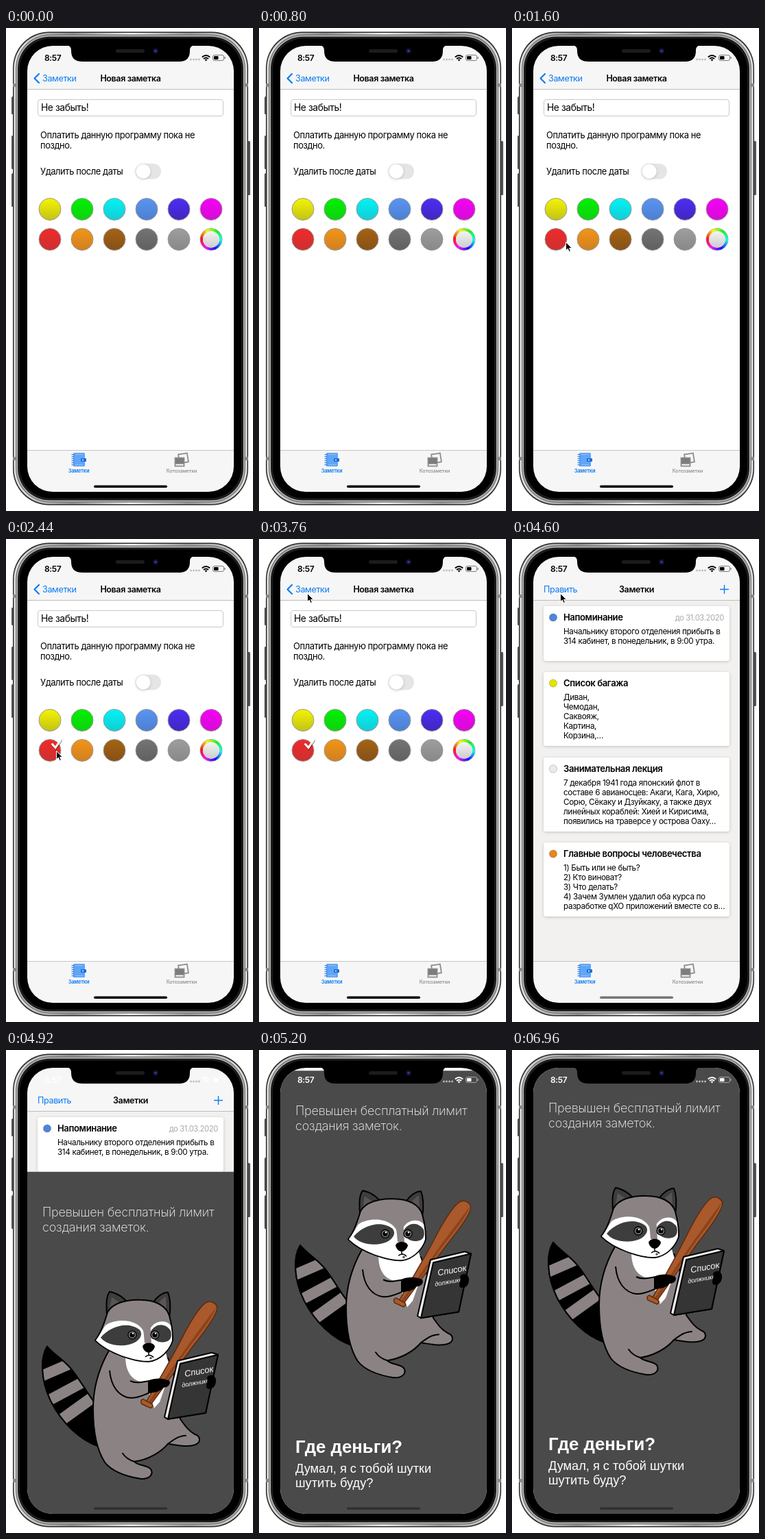
Animation of 360x705 px, one loop 8.6 s. Source, as an HTML page:

```html
<!DOCTYPE html>
<html lang="ru">
<head>
<meta charset="utf-8">
<title>Заметки</title>
<style>
  html, body { margin: 0; width: 100%; height: 100%; overflow: hidden; background: #fff; }
  svg { display: block; width: 360px; height: 705px; }
  text { font-family: Inter, Roboto, sans-serif; letter-spacing: -.03em; white-space: pre; }
  .bold { font-weight: 600; }
  .blue { fill: #0a7bf5; }
  .mid { text-anchor: middle; }
  .end { text-anchor: end; }
  .dark text { fill: #fff; font-family: "Liberation Sans", Arial, sans-serif; letter-spacing: 0; }
  .dark .thin { font-family: Inter, sans-serif; font-weight: 200; letter-spacing: -.01em; }
  .ink { stroke: #000; stroke-width: 2; stroke-linejoin: round; stroke-linecap: round; }
</style>
</head>
<body>
<svg id="stage" viewBox="0 0 360 705"></svg>
<script>
const LOOP = 8600, STEP = 40;
const FUR = '#8b8383', MASK = '#3d3d3d';

// ---- markup helpers ----
const rect = (x, y, w, h, r, fill, more = '') =>
  `<rect x="${x}" y="${y}" width="${w}" height="${h}" rx="${r}" fill="${fill}" ${more}/>`;
const circle = (x, y, r, fill, more = '') => `<circle cx="${x}" cy="${y}" r="${r}" fill="${fill}" ${more}/>`;
const path = (d, fill, more = '') => `<path d="${d}" fill="${fill}" ${more}/>`;
const line = (d, color, width, more = '') => path(d, 'none', `stroke="${color}" stroke-width="${width}" ${more}`);
const ink = (d, fill) => path(d, fill, 'class="ink"');
const text = (x, y, size, str, cls = '', more = '') =>
  `<text x="${x}" y="${y}" font-size="${size}" class="${cls}" ${more}>${str}</text>`;
const group = (id, body, more = '') => `<g id="${id}" ${more}>${body}</g>`;

let defs = '';
function gradient(id, colors, horizontal = false) {
  const stops = colors.map((c, i) => `<stop offset="${i / (colors.length - 1)}" stop-color="${c}"/>`).join('');
  defs += `<linearGradient id="${id}" x2="${horizontal ? 1 : 0}" y2="${horizontal ? 0 : 1}">${stops}</linearGradient>`;
  return `url(#${id})`;
}

// ---- device ----
function phoneBody() {
  const buttons = [[8, 100, 26], [8, 157, 49], [8, 212, 49], [351, 165, 79]]
    .map(([x, y, h]) => rect(x, y, 5, h, 1.5, '#555')).join('');
  const steel = gradient('steel', ['#e4e4e4', '#8e8e8e', '#f2f2f2', '#9a9a9a', '#e4e4e4'], true);
  return buttons +
    rect(10, 5.5, 343, 691, 53, '#2b2b2b') +
    rect(11.5, 7, 340, 688, 52, steel) +
    rect(14, 9.5, 335, 683, 50, '#777') +
    rect(15.5, 11, 332, 680, 49, '#c4c4c4') +
    rect(17, 12.5, 329, 677, 47, '#1d1d1d') +
    rect(20, 15.5, 323, 671, 45, '#000') +
    [10, 347].map(x => rect(x, 81, 6, 5, 0, '#888') + rect(x, 626, 6, 5, 0, '#888')).join('');
}

const notch = () =>
  path('M88 25C94 26 95 29 95 33C95 45 101 49 112 49H251C262 49 268 45 268 33C268 29 269 26 275 25Z', '#000') +
  rect(160, 31, 42, 5, 2.5, '#1c1c1c') + circle(218, 33.5, 4, '#10102c') + circle(218, 33.5, 1.8, '#2b3b9a');

function statusBar() {
  const dots = [270, 274, 278, 282].map(x => circle(x - .5, 46, 1.4, '#bbb')).join('');
  return text(56, 48, 12, '8:57', 'bold', 'fill="currentColor"') + dots +
    line('M285.8 42.5Q291.5 37.4 297.2 42.5M288 45Q291.5 42 295 45', 'currentColor', 1.9) +
    path('M289.6 46.2Q291.5 44.8 293.4 46.2L291.5 48.4Z', 'currentColor') +
    rect(301.5, 39.5, 16, 8, 2.4, 'none', 'stroke="currentColor" stroke-opacity=".5"') +
    rect(303, 41, 6.5, 5, 1, 'currentColor') + rect(318.5, 42, 1.3, 3, .6, 'currentColor', 'opacity=".5"');
}

// ---- note editor ----
function swatches() {
  const pairs = [
    ['#f4f400', '#c2c218'], ['#00f200', '#10d010'], ['#00f4f4', '#14ccd4'],
    ['#5a94f2', '#4c7fd0'], ['#4d2cf6', '#4227bd'], ['#f600f6', '#d40cd4'],
    ['#f02a2a', '#cc3030'], ['#f29418', '#d08020'], ['#a56312', '#865018'],
    ['#747474', '#606060'], ['#9e9e9e', '#888888'], ['#f4f4f4', '#cdcdcd']];
  return pairs.map((pair, i) => {
    const x = 64 + i % 6 * 47, y = i < 6 ? 264.5 : 308.5, last = i === 11;
    const fill = gradient('swatch' + i, pair);
    let out = circle(x, y, 16, last ? '#ddd' : fill, 'stroke="#999"');
    if (last) {
      for (let k = 0; k < 36; k++) {
        const at = a => `${x + 14 * Math.cos(a)} ${y + 14 * Math.sin(a)}`;
        const a = Math.PI + k * Math.PI / 18;
        out += line(`M${at(a)}L${at(a + .2)}`, `hsl(${k * 10},95%,52%)`, 3.6);
      }
      out += circle(x, y, 12, fill);
    }
    return out;
  }).join('');
}

const check = () => group('check',
  line('M67.5 299.5L72 304.5L79.5 293.5', '#0005', 4, 'transform="translate(.5 1)" stroke-linecap="round"') +
  line('M67.5 299.5L72 304.5L79.5 293.5', '#fff', 3, 'stroke-linecap="round"'));

const editor = () => group('editor',
  rect(31, 89, 301, 528, 0, '#fff', 'filter="url(#shade)"') +
  rect(46.5, 104.5, 270, 24, 3.5, '#fff', 'stroke="#c9c9c9"') +
  text(51, 121, 13.8, 'Не забыть!') +
  text(50, 160.5, 12.9, 'Оплатить данную программу пока не') +
  text(50, 176, 12.9, 'поздно.') +
  text(50, 214, 12.9, 'Удалить после даты') +
  rect(188.5, 198, 37.5, 22.5, 11.2, '#e5e5e5') +
  circle(200, 209.2, 10.5, '#fff', 'filter="url(#shade)"') +
  swatches() + check());

// ---- note list ----
function card(top, height, color, title, lines, date = '') {
  return rect(46, top, 271, height, 4, '#fff', 'filter="url(#shade)"') +
    circle(60, top + 16.5, 5.6, color, 'stroke="#0003"') +
    text(75, top + 21, 13.1, title, 'bold') +
    text(309, top + 20.5, 11.2, date, 'end', 'fill="#aaa"') +
    lines.map((s, i) => text(75, top + 41.3 + i * 13.9, 11.7, s)).join('');
}

const list = () => group('list',
  rect(31, 89, 301, 528, 0, '#f2f1ef') +
  card(98, 80, '#4f86dc', 'Напоминание',
    ['Начальнику второго отделения прибыть в', '314 кабинет, в понедельник, в 9:00 утра.'], 'до 31.03.2020') +
  card(194, 108, '#e4e400', 'Список багажа', ['Диван,', 'Чемодан,', 'Саквояж,', 'Картина,', 'Корзина,…']) +
  card(319, 108, '#ebebeb', 'Занимательная лекция',
    ['7 декабря 1941 года японский флот в', 'составе 6 авианосцев: Акаги, Кага, Хирю,',
     'Сорю, Сёкаку и Дзуйкаку, а также двух', 'линейных кораблей: Хией и Кирисима,',
     'появились на траверсе у острова Оаху…']) +
  card(443, 108, '#e8861a', 'Главные вопросы человечества',
    ['1) Быть или не быть?', '2) Кто виноват?', '3) Что делать?',
     '4) Зачем Зумлен удалил оба курса по', 'разработке qXO приложений вместе со в…']));

// ---- bars ----
const navBar = () =>
  rect(31, 26, 301, 63, 0, '#f6f6f6') + rect(31, 89, 301, 1, 0, '#bcbcbc') +
  group('editorNav', line('M48 67L41.5 73.5L48 80', '#0a7bf5', 2.2, 'stroke-linecap="round" stroke-linejoin="round"') +
    text(53, 78, 12.6, 'Заметки', 'blue')) +
  group('editorTitle', text(181.5, 78, 12.5, 'Новая заметка', 'bold mid')) +
  group('listTitle', text(181.5, 78, 12.5, 'Заметки', 'bold mid')) +
  group('listNav', text(46, 78, 12.6, 'Править', 'blue') + line('M303 73.5H316M309.5 67V80', '#0a7bf5', 1.4));

function tabBar() {
  let rings = '';
  for (let y = 622; y < 640; y += 3) rings += rect(95.5, y, 4, 1.3, .6, '#2f7fe6');
  return rect(31, 616, 301, 62, 0, '#f6f6f6') + rect(31, 616, 301, 1, 0, '#c4c4c4') +
    rect(98, 620, 17, 20, 1.5, '#62a5f5') + rings +
    line('M101 622.5H112M101 637.5H112', '#8fc0fa', 1) + rect(109, 628, 8, 5, 1, '#1a6fe0') +
    circle(112, 630.5, 1, '#fff') +
    text(106, 649, 7.5, 'Заметки', 'bold blue mid') +
    rect(252, 621.5, 13, 13, 0, '#f6f6f6', 'stroke="#8d8d8d" stroke-width="1.8" transform="rotate(-9 258 628)"') +
    rect(246.5, 627.5, 13, 12, 0, '#f6f6f6', 'stroke="#8d8d8d" stroke-width="1.8"') +
    rect(247, 628, 12, 8.5, 0, '#7d7d7d') +
    text(256, 649, 7.3, 'Котозаметки', 'mid', 'fill="#8d8d8d" font-weight="500"');
}

// ---- raccoon sheet ----
const tail = () => {
  const d = 'M60 281C50 297 50 330 66 362C82 393 108 418 136 427L130 364C120 352 108 330 96 315C84 300 70 293 60 281Z';
  defs += `<clipPath id="tail">${path(d, '#000')}</clipPath>`;
  return ink(d, '#000') + `<g clip-path="url(#tail)">` +
    line('M50 325L96 305', FUR, 16) + line('M60 361L114 332', FUR, 16) + line('M78 390L128 354', FUR, 17) +
    '</g>' + line(d, '#000', 2);
};

const torso = () =>
  ink('M150 287C136 312 127 340 127 372C127 404 131 430 144 450C155 464 178 471 196 474C208 475 216 468 211 460C206 454 192 455 187 449C207 446 225 436 236 423C250 425 262 428 274 425C285 422 284 412 275 409C266 404 262 398 254 387C250 350 246 316 236 298Z', FUR) +
  path('M174 295C174 316 182 332 202 333L216 371L224 362L240 316L233 291Z', '#fff') +
  line('M187 449C180 447 174 443 170 437M236 423C246 416 250 412 262 411', '#000', 2, 'stroke-linecap="round"');

const face = () =>
  ink('M147 234C146 219 146 208 151 201C162 203 173 210 178 219Z', MASK) +
  ink('M214 217C220 208 229 202 236 202C240 212 240 226 238 240Z', MASK) +
  path('M151 226L154 209L167 218ZM223 216L233 208L234 228Z', '#5a5555') +
  ink('M148 231C155 218 175 212 196 213C218 213 234 222 238 236C242 250 243 262 243 272C238 287 225 301 208 303C190 304 150 292 130 272C138 262 143 248 148 231Z', FUR) +
  path('M131 272C137 264 141 256 145 250C160 240 190 240 200 258L205 272L209 257C216 243 232 241 240 250C242 260 242 266 242 272C238 286 225 300 208 302C190 303 150 291 131 272Z', '#fff') +
  path('M138 268C150 253 176 243 194 256C202 264 193 275 180 278C163 282 146 278 138 268Z', MASK) +
  path('M211 259C218 247 232 246 240 258C242 266 240 271 236 273C225 278 211 272 211 259Z', MASK) +
  path('M199 244L210 244L212 276L202 276Z', FUR) +
  [[184, 264], [217, 264]].map(([x, y]) =>
    circle(x, y, 6, '#777', 'stroke="#000" stroke-width="1.3"') + circle(x, y, 3.6, '#000') + circle(x + 1, y - 2, 1.2, '#fff')).join('') +
  path('M199 281C201 274 215 274 217 281C216 286 211 290 208 290C204 290 200 286 199 281Z', '#000') +
  line('M208 289V294M203 296Q210 291 215 297', '#000', 1.5) + circle(211, 298, 1.8, '#555');

const bat = () => group('bat',
  path('M205 361C222 332 249 283 259 262C270 241 280 225 288 218C296 211 309 217 306 228C302 241 286 262 272 280C255 303 230 340 212 365Z', '#a9592b', 'stroke="#5c2b10" stroke-width="1.5"') +
  path('M305 223C300 239 283 260 270 277C254 299 231 336 211 364L208 362C230 331 256 290 276 263C288 246 298 233 305 223Z', '#8b431d') +
  path('M200 358L213 365Q216 369 211 371L198 365Q195 360 200 358Z', '#a9592b', 'stroke="#5c2b10" stroke-width="1.5"'));

const arm = () =>
  path('M151 316C153 340 165 354 181 356C194 357 203 350 214 347L211 331C200 332 191 336 181 331Z', FUR) +
  line('M151 316C153 340 165 354 181 356C194 357 203 350 214 347M181 331C191 336 200 332 211 331', '#000', 2) +
  path('M207 331C218 326 230 327 238 331C241 336 236 341 229 341C224 348 214 349 207 348Z', '#000');

const book = () =>
  ink('M231 384L250 302L300 290L309 293L291 378L236 387Z', '#eee') +
  ink('M236 387L254 306L309 293L291 378Z', '#353535') +
  `<g transform="rotate(-10 262 325)">` + text(261, 325, 12.7, 'Список', '', 'font-style="italic"') +
  text(254, 339.5, 9.2, 'должников', '', 'font-style="italic"') + '</g>' +
  path('M293 326C298 320 306 323 306 331C306 340 299 345 293 342C290 337 295 333 293 326Z', '#000');

const sheet = () => group('sheet',
  rect(31, 26, 301, 652, 0, '#4a4a4a') +
  text(53, 91, 18, 'Превышен бесплатный лимит', 'thin') +
  text(53, 113, 18, 'создания заметок.', 'thin') +
  tail() + torso() + face() + bat() + arm() + book() +
  text(53, 584, 25.8, 'Где деньги?', '', 'font-weight="700"') +
  text(53, 612.5, 18.2, 'Думал, я с тобой шутки') +
  text(53, 634, 18.2, 'шутить буду?'), 'class="dark"');

const cursor = () => group('cursor',
  path('M0 0V12.2L2.8 9.6L4.8 14L6.9 13L5 8.8H8.8Z', '#000', 'stroke="#fff" stroke-width="1" stroke-linejoin="round"'));

// ---- scene ----
const scene = phoneBody() +
  `<g clip-path="url(#screen)">` + list() + editor() + navBar() + tabBar() + sheet() +
  group('status', statusBar()) + rect(128, 667.5, 107, 3.6, 1.8, '#000', 'id="home"') + '</g>' +
  notch() + cursor();
defs += `<clipPath id="screen">${rect(31, 26, 301, 651, 37, '#000')}</clipPath>
  <filter id="shade" x="-20%" y="-20%" width="140%" height="140%">
    <feDropShadow dx="0" dy="1" stdDeviation="2" flood-opacity=".2"/></filter>`;
const stage = document.getElementById('stage');
stage.innerHTML = `<defs>${defs}</defs>${scene}`;

// ---- motion ----
const part = Object.fromEntries([...stage.querySelectorAll('[id]')].map(e => [e.id, e]));
const clamp = v => Math.max(0, Math.min(1, v));
const smooth = v => (v = clamp(v), v * v * (3 - 2 * v));
const move = (el, x, y) => el.setAttribute('transform', `translate(${x} ${y})`);
const show = (el, on) => el.style.display = on ? '' : 'none';

// Pointer stops: time, x, y.
const stops = [[1040, 318, 430], [1560, 78.5, 312.5], [1680, 78.5, 312.5], [2000, 73.5, 309.5],
  [2640, 73.5, 309.5], [3480, 70.5, 79.5], [4610, 70.5, 79.5], [4720, 309, 73], [4760, 309, 73]];

function pointer(t) {
  const i = stops.findIndex(s => s[0] > t);
  if (i < 1) return null;
  const [t0, x0, y0] = stops[i - 1], [t1, x1, y1] = stops[i];
  const k = smooth((t - t0) / (t1 - t0));
  return [x0 + (x1 - x0) * k, y0 + (y1 - y0) * k];
}

function draw(t) {
  const at = pointer(t);
  show(part.cursor, at);
  if (at) move(part.cursor, ...at);
  show(part.check, t >= 2200);

  // Back to the list
  const pop = 1 - (1 - clamp((t - 3840) / 480)) ** 3;
  move(part.editor, 310 * pop, 0);
  show(part.editor, pop < 1);
  move(part.list, -90 * (1 - pop), 0);
  part.editorNav.style.opacity = 1 - clamp(pop * 1.6);
  move(part.editorNav, 100 * pop, 0);
  part.editorTitle.style.opacity = 1 - pop;
  move(part.editorTitle, 130 * pop, 0);
  part.listTitle.style.opacity = pop;
  move(part.listTitle, -103 * (1 - pop), 0);
  part.listNav.style.opacity = pop;

  // Sheet springs up from below
  const s = Math.max(0, t - 4740) * .0155;
  const rest = 652 * (1 + s) * Math.exp(-s);
  show(part.sheet, s > 0);
  move(part.sheet, 0, rest < .5 ? 0 : rest);
  const covered = rest < 330;
  part.status.style.color = covered ? '#fff' : '#000';
  const grey = Math.round(118 * pop);
  part.home.setAttribute('fill', covered ? '#303030' : `rgb(${grey},${grey},${grey})`);

  const swing = (Math.min(t, 6960) - 5200) / 1760 * 3 * Math.PI;
  part.bat.setAttribute('transform', `rotate(${.5 * (1 + Math.cos(swing))} 222 338)`);
}

function tick() {
  draw(Math.floor(performance.now() % LOOP / STEP) * STEP);
  requestAnimationFrame(tick);
}
tick();
</script>
</body>
</html>
```
